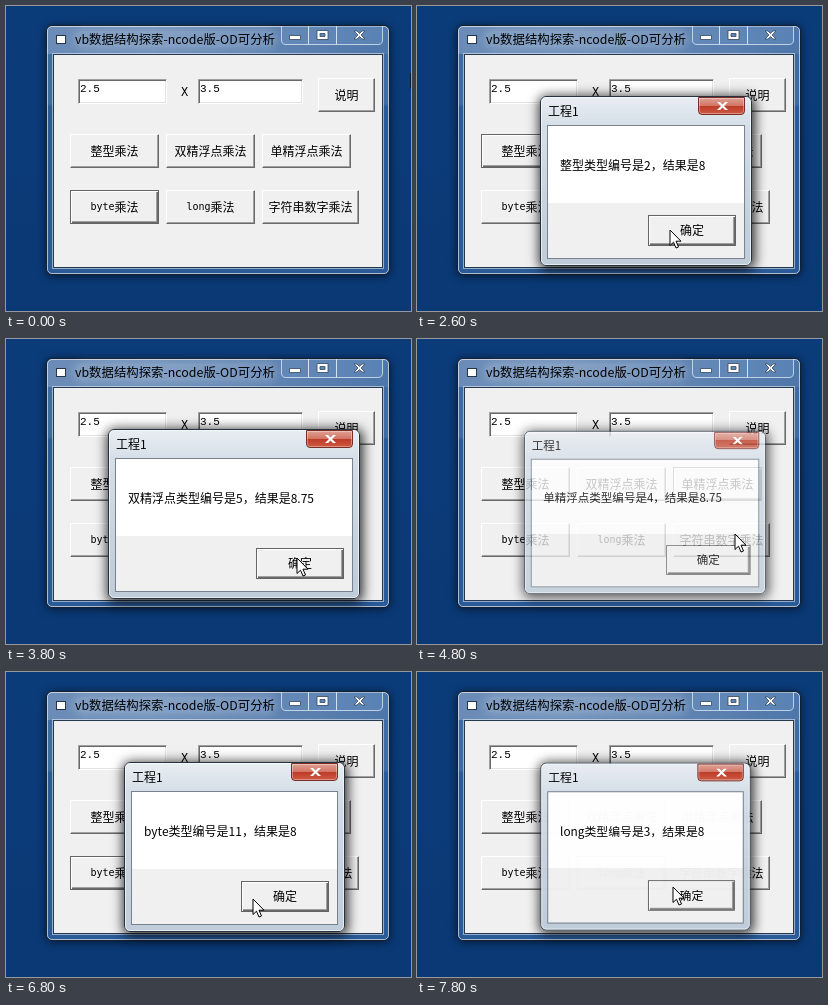
An HTML page that plays this animation: 405 by 305 pixels, repeating every 8 s.

```html
<!DOCTYPE html>
<html lang="zh-CN">
<head>
<meta charset="utf-8">
<title>乘法</title>
<style>
html, body { margin: 0; width: 100%; height: 100%; overflow: hidden; background: #0b3b78; }
* { box-sizing: border-box; }
#stage {
  position: absolute; left: 0; top: 0; width: 405px; height: 305px; overflow: hidden;
  background: linear-gradient(#0b3c7a, #0a3975);
  font: 12px/16px "Noto Sans CJK SC", "Noto Sans CJK", sans-serif; color: #000; white-space: nowrap;
}
#stage div, #stage svg { position: absolute; }

.window { border: 1px solid #14202e; border-radius: 6px; }
.window::before {
  content: ""; position: absolute; inset: 0; border-radius: 5px;
  border: 1px solid rgba(255, 255, 255, .6);
}
#main {
  --sheen: rgba(255, 255, 255, .1);
  left: 40px; top: 19px; width: 344px; height: 250px;
  background:
    linear-gradient(90deg, rgba(255, 255, 255, .22), rgba(255, 255, 255, .26) 30%, rgba(255, 255, 255, .08)) 0 0 / 100% 28px no-repeat,
    linear-gradient(rgba(255, 255, 255, .1) 20px, var(--sheen) 78px, transparent 81px),
    #2a5a98;
  box-shadow: 0 1px 8px rgba(0, 0, 0, .6);
}
#main.active {
  --sheen: rgba(255, 255, 255, .7);
  box-shadow: 1px 3px 14px 1px rgba(0, 0, 0, .85);
}
#caption {
  left: 28px; top: 5px; height: 16px; border-radius: 8px; font-size: 12.4px;
  background: rgba(255, 255, 255, .14); box-shadow: 0 0 7px 3px rgba(255, 255, 255, .14);
}
#icon { left: 9px; top: 9px; width: 10px; height: 9px; background: #fff; border: 1px solid #26364a; }
#client {
  left: 47px; top: 48px; width: 330px; height: 214px; background: #f0f0f0;
  border: 1px solid #243950; box-shadow: 0 0 0 1px rgba(255, 255, 255, .5);
}

.controls { left: 234px; top: 0; }
.controls .cell { fill: rgba(110, 150, 195, .35); stroke: rgba(225, 236, 248, .75); }
.controls .glyph { fill: #fff; stroke: #33475f; stroke-width: .8; }
.active .controls .cell { fill: rgba(60, 90, 130, .4); }
.active .controls .close { fill: url(#red); }

.field {
  top: 73px; height: 25px; padding: 3px 1px; background: #fff;
  border: 1px solid; border-color: #a0a0a0 #fff #fff #a0a0a0;
  box-shadow: inset 1px 1px #696969, inset -1px -1px #e3e3e3;
  font: 11px/12px "Liberation Mono", monospace;
}
.button {
  display: flex; align-items: center; justify-content: center; padding-bottom: 1px;
  background: #f0f0f0; border: 1px solid; border-color: #fff #696969 #696969 #fff;
  box-shadow: inset -1px -1px #a0a0a0;
}
.button span { font: 10px/16px "DejaVu Sans Mono", monospace; }
.button.focus { border-color: #646464; box-shadow: inset 1px 1px #fff, inset -1px -1px #696969, inset -2px -2px #a0a0a0; }
.button.pressed { border-color: #333; box-shadow: inset 0 0 0 1px #a0a0a0; padding: 1px 0 0 2px; }
.button.pressed::after { content: ""; position: absolute; inset: 3px; border: 1px dotted #000; }

.dialog {
  top: 90px; height: 170px; visibility: hidden; border-color: #26323f;
  background: linear-gradient(#e8edf2, #d6dfe8 28px, #c8d3df 60%, #bfccd9);
  box-shadow: 1px 2px 12px 2px rgba(0, 0, 0, .8);
}
.dialog .name { left: 7px; top: 6px; }
.dialog .body {
  left: 6px; right: 6px; top: 28px; bottom: 6px; border: 1px solid #77828e;
  background: linear-gradient(#fff 77px, #f0f0f0 77px);
}
.dialog .message { left: 19px; top: 60px; }
.dialog .button { right: 15px; top: 118px; width: 88px; height: 31px; }
.dialog .exit {
  right: 6px; top: 0; width: 47px; height: 18px; border: 1px solid #7a2c25; border-radius: 0 0 4px 4px;
  background: linear-gradient(#e0a095, #d27564 48%, #bd3a27 50%, #cd5a42);
  box-shadow: inset 0 0 0 1px rgba(255, 255, 255, .35);
}
.exit svg { left: 18px; top: 4px; }
</style>
</head>
<body>
<div id="stage">
  <div id="main" class="window">
    <div id="icon"></div>
    <div id="caption">vb数据结构探索-ncode版-OD可分析</div>
    <svg class="controls" width="103" height="20">
      <linearGradient id="red" x2="0" y2="1">
        <stop stop-color="#e0a095"/><stop offset=".48" stop-color="#d27564"/>
        <stop offset=".5" stop-color="#b5301d"/><stop offset="1" stop-color="#cd5a42"/>
      </linearGradient>
      <path class="cell" d="M.5 0V14Q.5 18.500 5 18.500H27.500V0"/>
      <path class="cell" d="M27.500 0V18.500H55.500V0"/>
      <path class="cell close" d="M55.500 0V18.500H97Q101.500 18.500 101.500 14V0"/>
      <path class="glyph" d="M8.500 9.500h11v4h-11z"/>
      <path class="glyph" fill-rule="evenodd" d="M36 4.500h11v9H36zM39 7.500v3h5v-3z"/>
      <path class="glyph" d="M73 5h3l2.500 2.500L81 5h3l-4 4 4 4h-3l-2.500-2.500L76 13h-3l4-4z"/>
    </svg>
  </div>
  <div id="client"></div>
  <div class="field" style="left:72px;width:89px">2.5</div>
  <div style="left:175px;top:79px;font:12px/16px 'Liberation Mono',monospace">X</div>
  <div class="field" style="left:192px;width:105px">3.5</div>
  <div id="buttons"></div>
  <div id="dialogs"></div>
  <svg id="cursor" width="14" height="21" viewBox="-.5 -.5 14 21">
    <path d="M.5.5V16L4 12.700 6.500 18.500 9 17.500 6.500 11.700H11.500Z" fill="#fff" stroke="#000"/>
  </svg>
</div>
<script>
const STEP = 200, STEPS = 40;
const get = id => document.getElementById(id);

function add(parent, className, html, style) {
  const el = document.createElement('div');
  el.className = className;
  el.innerHTML = html;
  for (const key in style) el.style[key] = style[key] + 'px';
  parent.append(el);
  return el;
}

const buttons = [
  ['整型乘法', 64, 128, 89],
  ['双精浮点乘法', 160, 128, 89],
  ['单精浮点乘法', 256, 128, 89],
  ['<span>byte</span>乘法', 64, 184, 89],
  ['<span>long</span>乘法', 160, 184, 89],
  ['字符串数字乘法', 256, 184, 97],
  ['说明', 312, 72, 57]
].map(([label, left, top, width]) =>
  add(get('buttons'), 'button', label, { left, top, width, height: 34 }));

// One entry per multiplication: the steps at which it is pressed, opens and closes.
const rounds = [
  { text: '整型类型编号是2，结果是8', left: 123, width: 212, press: 7, open: 8, close: 14 },
  { text: '双精浮点类型编号是5，结果是8.75', left: 102, width: 252, press: 16, open: 17, close: 20 },
  { text: '单精浮点类型编号是4，结果是8.75', left: 102, width: 252, press: 23, open: 24, close: 28 },
  { text: 'byte类型编号是11，结果是8', left: 118, width: 221, press: 30, open: 31, close: 35 },
  { text: 'long类型编号是3，结果是8', left: 122, width: 213, press: 36, open: 37, close: 39, fade: .3 }
];
const cross = '<svg width="11" height="9"><path d="M0 0h3l2.500 2.500L8 0h3L7 4l4 4H8L5.500 5.500 3 8H0l4-4z" fill="#fff"/></svg>';
for (const r of rounds) {
  r.el = add(get('dialogs'), 'window dialog',
    `<div class="name">工程1</div><div class="exit">${cross}</div><div class="body"></div>` +
    `<div class="message">${r.text}</div><div class="button focus">确定</div>`,
    { left: r.left, width: r.width });
}

// Pointer stops: step, x, y
const path = [
  [0, 404, 66], [6, 111, 150], [8, 111, 150], [13, 252, 223], [14, 258, 222],
  [16, 208, 145], [17, 208, 145], [19, 290, 218], [20, 290, 218], [23, 322, 148],
  [24, 317, 194], [26, 285, 220], [28, 285, 220], [30, 113, 206], [31, 113, 206],
  [34, 246, 226], [35, 256, 222], [36, 212, 205], [37, 212, 205], [39, 255, 214]
];

function pointerAt(step) {
  const i = Math.max(1, path.findIndex(p => p[0] >= step));
  const [s0, x0, y0] = path[i - 1], [s1, x1, y1] = path[i];
  const k = (step - s0) / (s1 - s0);
  return [x0 + (x1 - x0) * k, y0 + (y1 - y0) * k].map(Math.round);
}

function draw(step) {
  let focus = 3, pressed = false, open = false;
  rounds.forEach((r, i) => {
    if (step >= r.press) focus = i;
    if (step === r.press) pressed = true;
    const shown = step >= r.open && step <= r.close;
    const fade = step === r.open ? 1 : step === r.close ? r.fade || 1 : 0;
    open = open || shown;
    r.el.style.visibility = shown ? 'visible' : 'hidden';
    r.el.style.opacity = 1 - .22 * fade * fade;
    r.el.style.transform = `translateY(${-1.5 * fade}px) scale(${1 - .04 * fade})`;
  });
  buttons.forEach((b, i) => {
    b.classList.toggle('focus', i === focus);
    b.classList.toggle('pressed', pressed && i === focus);
  });
  get('main').classList.toggle('active', step >= rounds[0].press && !open);
  const [x, y] = pointerAt(step);
  get('cursor').style.transform = `translate(${x}px, ${y}px)`;
}

const start = performance.now();
function tick(now) {
  draw(Math.floor(Math.max(0, now - start) / STEP) % STEPS);
  requestAnimationFrame(tick);
}
draw(0);
requestAnimationFrame(tick);
</script>
</body>
</html>
```
